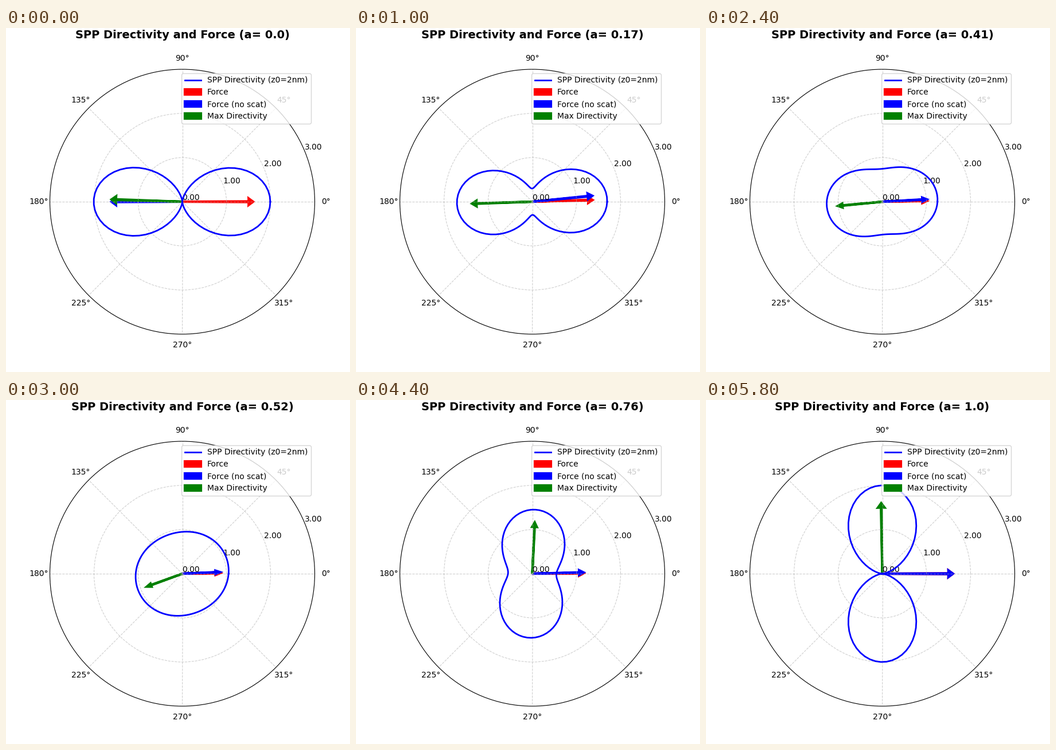
Write a matplotlib script that moves like this. It is 600 by 600 pixels and loops after 6 s.

```python
import numpy as np
import matplotlib.pyplot as plt
from matplotlib.animation import FuncAnimation

plt.rcParams["font.family"] = "DejaVu Sans"

FRAMES = 30
INTERVAL = 200
theta = np.linspace(0, 2 * np.pi, 100)


def directivity(a):
    """Angular emission of an elliptical dipole, a = share along y."""
    w = 0.842 * a / (0.842 * a + 1 - a)
    tilt = 0.08 * np.sqrt(w * (1 - w))
    return (1 + (1 - 2 * w) * np.cos(2 * theta) + tilt * np.sin(2 * theta)
            - 0.007 * (1 - w) * np.cos(theta))


def force_angles(a):
    mix = np.sqrt(a * (1 - a))
    full = np.arctan2(0.016 * mix, a + 0.04)
    bare = np.arctan2(0.0445 * mix, a - 0.002)
    return full, bare


fig = plt.figure(figsize=(6, 6), dpi=100)
ax = fig.add_subplot(projection="polar")
curve, = ax.plot(theta, directivity(0), color="blue", lw=2,
                 label="SPP Directivity (z0=2nm)")


def add_arrow(color, label):
    return ax.arrow(0, 0, 0, 1.6, width=0.01, head_width=0.1, head_length=0.1,
                    length_includes_head=True, color=color, lw=3, label=label)


arrows = [add_arrow("red", "Force"),
          add_arrow("blue", "Force (no scat)"),
          add_arrow("green", "Max Directivity")]

ax.set_ylim(0, 3)
ticks = [0, 1, 2, 3]
ax.set_yticks(ticks, [f"{t:.2f}" for t in ticks])
ax.grid(True, linestyle="--", alpha=0.6)
ax.legend(loc="upper right")
title = ax.set_title("", fontsize=14, fontweight="bold", pad=20)


def update(i):
    a = i / (FRAMES - 1)
    d = directivity(a)
    curve.set_ydata(d)
    peak = np.argmax(np.round(d, 8))
    for arrow, angle in zip(arrows, (*force_angles(a), theta[peak])):
        arrow.set_data(x=angle, y=0, dx=0, dy=0.8 * d[peak])
    title.set_text(f"SPP Directivity and Force (a= {round(a, 2)})")
    return [curve, title, *arrows]


anim = FuncAnimation(fig, update, frames=FRAMES, interval=INTERVAL,
                     repeat=True, repeat_delay=0, blit=False)
plt.show()
```
